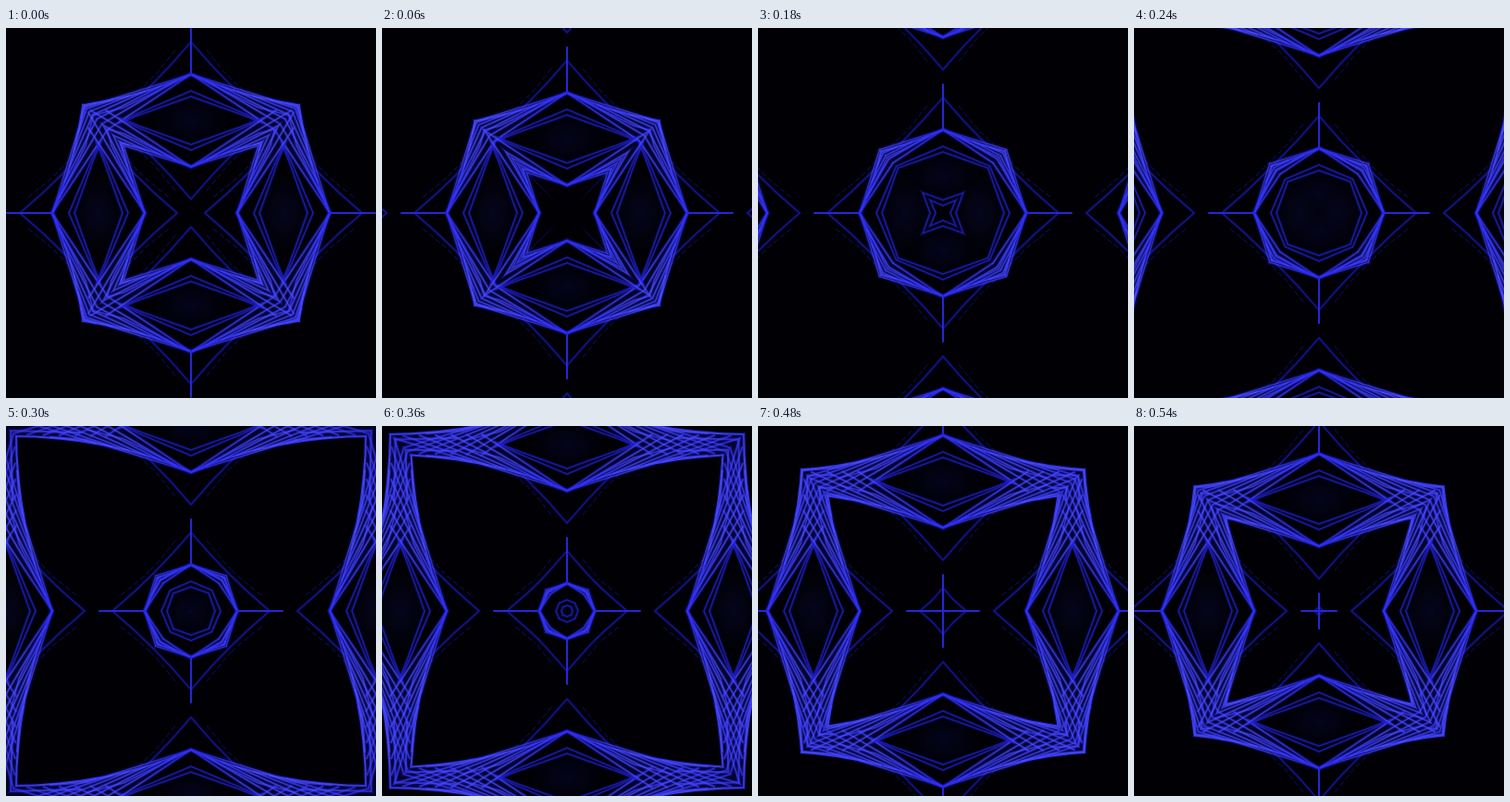
Write an HTML page that moves like this. It is 400 px wide and 400 px high and loops after 600 ms.

```html
<!DOCTYPE html>
<html lang="en">
<head>
<meta charset="utf-8">
<title>Blue kaleidoscope</title>
<style>
  html, body { margin: 0; width: 100%; height: 100%; overflow: hidden; background: #010105; }
  svg { display: block; width: 100vw; height: 100vh; }
  path { fill: none; stroke-linecap: round; stroke-linejoin: round; }
  .flow { animation: flow .6s steps(10, end) infinite; }
  @keyframes flow { to { transform: translateY(200px); } }
  .wash { fill: #1a1ae0; fill-opacity: .12; }
  .glow { stroke: #2222ff; stroke-opacity: .16; stroke-width: 5; }
  .soft { stroke: #1c1cd0; stroke-opacity: .16; stroke-width: 4; }
  .beam { stroke: url(#blue); stroke-width: 2.2; stroke-opacity: .85; }
  .streak { stroke: url(#blue); stroke-width: 1.8; stroke-opacity: .65; }
  .thin { stroke: #2222c8; stroke-width: 1.4; stroke-opacity: .75; }
  .edge { stroke: #1a1ab0; stroke-width: 1.4; stroke-opacity: .8; }
  .faint { stroke: #1616a0; stroke-width: 1.1; stroke-opacity: .5; stroke-dasharray: 6 3; stroke-linecap: butt; }
</style>
</head>
<body>
<svg id="stage" viewBox="-200 -200 400 400">
  <defs>
    <linearGradient id="blue" gradientUnits="userSpaceOnUse" x1="0" y1="0" x2="200" y2="0">
      <stop offset="0" stop-color="#3030f0"/>
      <stop offset=".35" stop-color="#5050ff"/>
      <stop offset=".75" stop-color="#4a4aff"/>
      <stop offset="1" stop-color="#3838f8"/>
    </linearGradient>
    <radialGradient id="haze">
      <stop offset="0" stop-color="#10106c" stop-opacity=".22"/>
      <stop offset="1" stop-color="#10106c" stop-opacity="0"/>
    </radialGradient>
    <clipPath id="wedge"><path d="M0 0V-201H201.4L.4 0Z"/></clipPath>
    <g id="half"></g>
    <!-- one period of the strip, 200 high, centred on its own axis -->
    <g id="tile" transform="translate(0 -100)">
      <ellipse rx="42" ry="30" fill="url(#haze)"/>
      <use href="#half"/>
      <use href="#half" transform="scale(1 -1)"/>
      <path d="M0 -50V-99" stroke="#2626d8" stroke-width="2"/>
    </g>
  </defs>
</svg>
<script>
  const NS = 'http://www.w3.org/2000/svg';
  const add = (parent, name, attrs) => {
    const el = document.createElementNS(NS, name);
    for (const key in attrs) el.setAttribute(key, attrs[key]);
    return parent.appendChild(el);
  };
  const half = document.getElementById('half');
  const stroke = (d, ...names) =>
    names.forEach(name => add(half, 'path', { d, class: name }));

  // Outer hull of the bundle: a quadratic curve and points along it
  const hull = 'M0 -50Q90 -10 200 -11';
  const onHull = t => [
    180 * t * (1 - t) + 200 * t * t,
    -50 * (1 - t) ** 2 - 20 * t * (1 - t) - 11 * t * t
  ];

  // Veils outside the bundle
  stroke('M0 -85L22 -60L48 -33', 'soft', 'edge');
  stroke('M17 -76L38 -50L62 -27', 'faint');

  // Nested lines of the eye
  stroke('M0 -32L52 -10L76 1', 'soft', 'thin');
  stroke('M0 -26L53 -7L78 3', 'soft', 'thin');

  // Fill between the hull and the axis, beyond the tip of the eye
  stroke(hull + 'V0H68Z', 'wash');
  stroke(hull, 'glow', 'beam');

  // Beams fanning from the vertex
  stroke('M0 -50L112 -15L152 -12', 'glow', 'streak');
  stroke('M0 -50L73 -14L112 -4', 'glow', 'streak');

  // Straight streaks that cross the axis to the far side
  for (let i = 0; i < 7; i++) {
    const [x, y] = onHull(i * .09);
    stroke(`M${x} ${y}L${x + 92} ${11 - i * .3}`, 'glow', 'streak');
  }
  stroke('M120 -7L200 -5', 'glow', 'streak');

  const stage = document.getElementById('stage');
  for (let i = 0; i < 8; i++) {
    const wedge = add(stage, 'g', {
      transform: `rotate(${(i >> 1) * 90}) scale(${i % 2 ? -1 : 1} 1)`,
      'clip-path': 'url(#wedge)'
    });
    const flow = add(wedge, 'g', { class: 'flow' });
    for (const y of [0, -200]) add(flow, 'use', { href: '#tile', y });
  }
</script>
</body>
</html>
```
